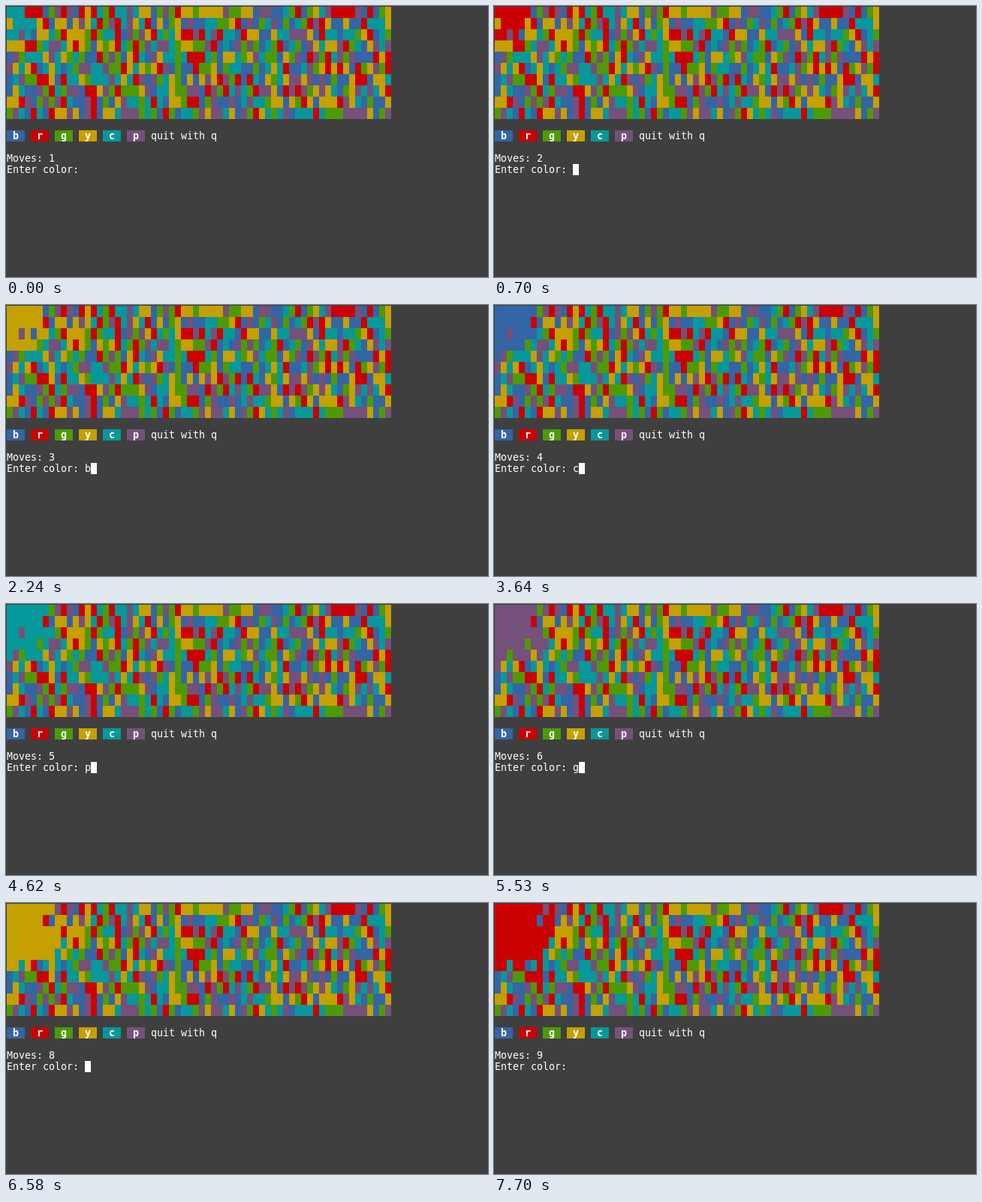
Recreate the animation shown at these times as an HTML page with a canvas. Size 642 by 362 pixels, loop 8000 ms.

```html
<!DOCTYPE html>
<html lang="en">
<head>
<meta charset="utf-8">
<title>Color flood</title>
<style>
html, body { margin: 0; width: 100%; height: 100%; overflow: hidden; background: #3f3f3f; }
canvas { display: block; }
</style>
</head>
<body>
<canvas id="stage" width="642" height="362"></canvas>
<script>
const ctx = document.getElementById('stage').getContext('2d');
const COLS = 64, CW = 8, CH = 15, PAD = 1, LOOP = 8000;
const FONT = '10pt "DejaVu Sans Mono", monospace';
const COLORS = {
  b: '#3465a4', r: '#cc0000', g: '#4e9a06',
  y: '#c4a000', c: '#06989a', p: '#75507b'
};
const KEYS = Object.keys(COLORS);

// The corner where the game is played; the rest of the board is random.
const CORNER = [
  'cccrrrbgprpbry',
  'yccccyrbyybypy',
  'ccpcbyycgryyyg',
  'yyyrrgcppcyryg',
  'bpgcccypcygcgb',
  'pycyrbcycbcgpp',
  'bcpggrrybrccyg',
  'bycbbpgrcgppbr',
  'yyrpbgpgprcbbp',
  'gpcbrcbryypybp'
];

// Each move: key, time it is typed, time it is entered.
const MOVES = [
  ['r', 490, 700], ['y', 1470, 1820], ['b', 2240, 2520], ['c', 3640, 3850],
  ['p', 4620, 4900], ['g', 5530, 5740], ['y', 6300, 6580], ['r', 6930, 7140]
];
const CURSOR_OFF = [
  [0, 420], [1260, 1470], [3150, 3640], [4480, 4620], [5460, 5530], [7700, LOOP]
];

function randomizer(seed) {
  return () => {
    seed = (Math.imul(seed, 1664525) + 1013904223) >>> 0;
    return seed / 4294967296;
  };
}

function firstBoard() {
  const rand = randomizer(71);
  return CORNER.map(row => {
    const cells = [...row];
    while (cells.length < COLS) cells.push(KEYS[Math.floor(rand() * KEYS.length)]);
    return cells;
  });
}

function flood(board, key) {
  const next = board.map(row => row.slice());
  const old = next[0][0];
  const stack = [[0, 0]];
  while (old !== key && stack.length) {
    const [x, y] = stack.pop();
    if (!next[y] || next[y][x] !== old) continue;
    next[y][x] = key;
    stack.push([x + 1, y], [x - 1, y], [x, y + 1], [x, y - 1]);
  }
  return next;
}

const boards = [firstBoard()];
for (const [key] of MOVES) boards.push(flood(boards[boards.length - 1], key));

function fill(col, row, width, color) {
  ctx.fillStyle = color;
  ctx.fillRect(PAD + col * CW, PAD + row * CH, width * CW, CH);
}

// Terminal text: one character per cell.
function print(text, col, row, bold) {
  ctx.font = (bold ? 'bold ' : '') + FONT;
  ctx.fillStyle = '#ffffff';
  [...text].forEach((ch, i) => ctx.fillText(ch, PAD + (col + i) * CW, PAD + row * CH + 12));
}

function draw(t) {
  const done = MOVES.filter(m => t >= m[2]).length;
  const typed = done < MOVES.length && t >= MOVES[done][1] ? MOVES[done][0] : '';
  const prompt = 'Enter color: ' + typed;

  ctx.fillStyle = '#3f3f3f';
  ctx.fillRect(0, 0, 642, 362);
  boards[done].forEach((cells, y) => cells.forEach((key, x) => fill(x, y, 1, COLORS[key])));

  KEYS.forEach((key, i) => {
    fill(i * 4, 11, 3, COLORS[key]);
    print(key, i * 4 + 1, 11, true);
  });
  print('quit with q', 24, 11);
  print('Moves: ' + (done + 1), 0, 13);
  print(prompt, 0, 14);

  const hidden = CURSOR_OFF.some(([from, to]) => t >= from && t < to);
  if (!hidden) fill(prompt.length, 14, 1, '#ffffff');
}

const start = performance.now();
function tick() {
  draw((performance.now() - start) % LOOP);
  requestAnimationFrame(tick);
}
tick();
</script>
</body>
</html>
```
